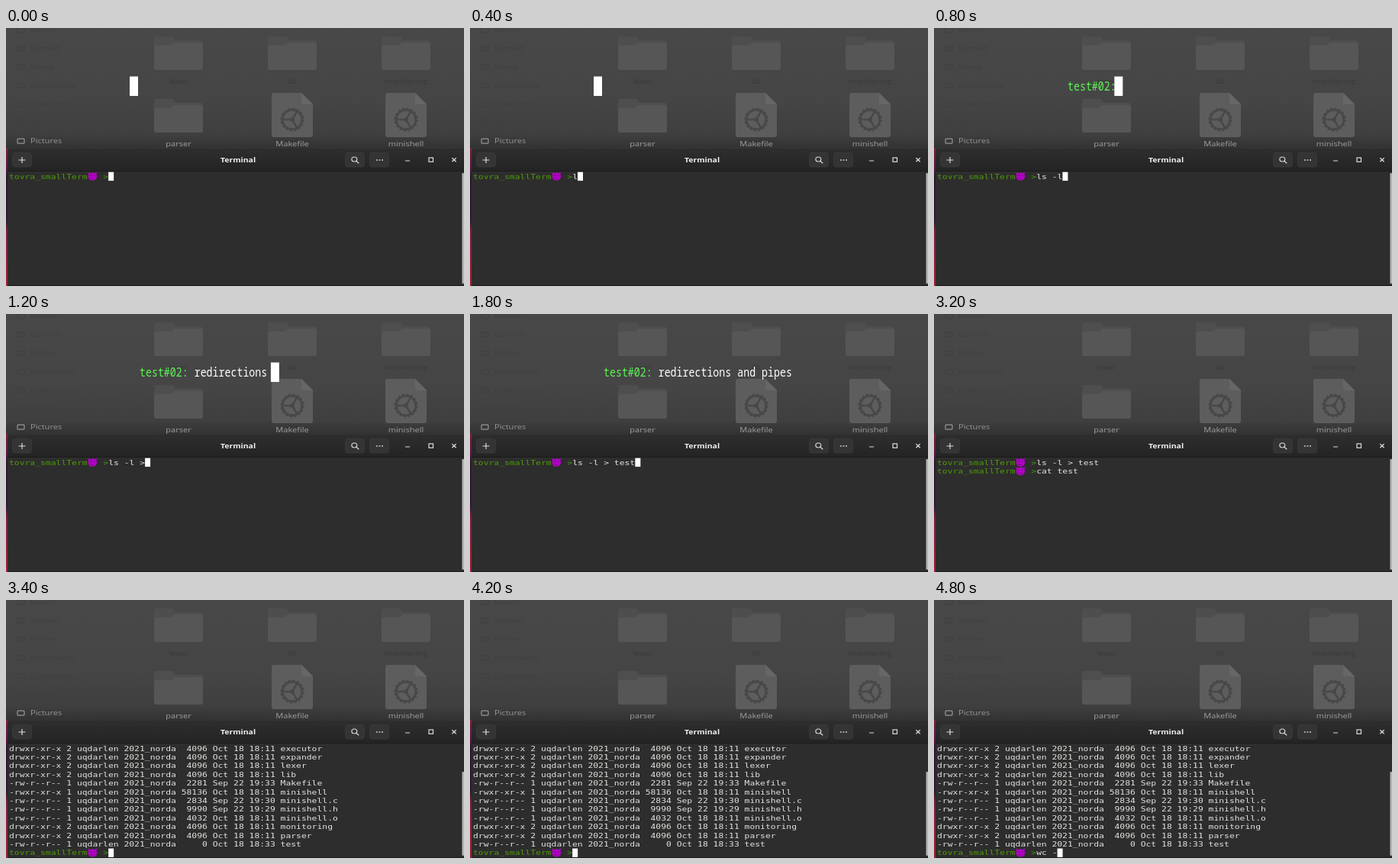
Animation of 600 by 338 pixels, one loop 5 s. Source, as an HTML page:

```html
<!DOCTYPE html>
<html lang="en">
<head>
<meta charset="utf-8">
<title>Shell demo</title>
<style>
html, body { margin: 0; height: 100%; overflow: hidden; background: #2d2d2d; }
svg { display: block; width: 100vw; height: 100vh; }
text { white-space: pre; }
.ui { font: 9.5px "Open Sans", sans-serif; }
.term { font: 9.2px "DejaVu Sans Mono", monospace; }
.title { font: 15.5px "Noto Sans Mono", monospace; }
</style>
</head>
<body>
<svg viewBox="0 0 600 338">
  <defs>
    <linearGradient id="desk" x2="0" y2="1">
      <stop offset="0" stop-color="#484848"/>
      <stop offset=".6" stop-color="#454545"/>
      <stop offset=".88" stop-color="#3f3f3f"/>
      <stop offset="1" stop-color="#323232"/>
    </linearGradient>
    <linearGradient id="head" x2="0" y2="1">
      <stop offset="0" stop-color="#2e2e2e"/>
      <stop offset="1" stop-color="#242424"/>
    </linearGradient>
    <linearGradient id="wall" x2="0" y2="1">
      <stop offset="0" stop-color="#7c2146"/>
      <stop offset=".15" stop-color="#5a1c40"/>
      <stop offset=".2" stop-color="#2c1a2e"/>
      <stop offset=".53" stop-color="#331a30"/>
      <stop offset=".6" stop-color="#7d2040"/>
      <stop offset="1" stop-color="#a0243c"/>
    </linearGradient>
    <clipPath id="reveal"><rect id="shown" y="60" width="0" height="32"/></clipPath>
    <g id="folder">
      <path d="M-32 -19q0-3 3-3h20q2 0 3 2l2 3h33q3 0 3 3v33h-64z" fill="#4e4e4e"/>
      <path d="M-32 -8q0-2 3-2h18q2 0 4-2l2-2h34q3 0 3 3v30q0 3-3 3h-58q-3 0-3-3z" fill="#565656"/>
    </g>
    <g id="file">
      <path d="M-27 -26q0-3 3-3h36l15 15v40q0 3-3 3h-48q-3 0-3-3z" fill="#5d5d5d"/>
      <path d="M12 -29l15 15h-12q-3 0-3-3z" fill="#666"/>
      <g transform="translate(0 6)" fill="none" stroke="#484848">
        <circle r="14.8" stroke-width="1.6" stroke-dasharray="3 2.81"/>
        <circle r="12.8" stroke-width="3"/>
        <path d="M0 0H-12M0 0L6 -10.4M0 0L6 10.4" stroke-width="2.6"/>
        <circle r="2.5" fill="#484848"/>
      </g>
    </g>
    <g id="imp" fill="#b400c8">
      <path d="M-6 -5.5q0 3 2 4l2-2zM6 -5.5q0 3-2 4l-2-2z"/>
      <ellipse rx="5.8" ry="5.2" cy=".3"/>
      <path d="M-3.4 -1.6l2.4 1M3.4 -1.6l-2.4 1M-2.8 2.2q2.8 2.2 5.6 0" fill="none" stroke="#740086"/>
    </g>
  </defs>

  <rect width="600" height="158" fill="url(#desk)"/>
  <g id="files"></g>

  <rect y="157" width="4" height="181" fill="url(#wall)"/>
  <path d="M2 338V161q0-4 4-4H600V338z" fill="#2d2d2d"/>
  <path d="M2 187V161q0-4 4-4H600V187z" fill="url(#head)"/>
  <path d="M5 157.5H600" stroke="#343434"/>
  <path d="M2 187.5H600M2 337.5H600" stroke="#1b1b1b"/>
  <g fill="#343434" stroke="#3d3d3d" stroke-width=".7">
    <rect x="8.5" y="163.5" width="25" height="18.5" rx="3.5"/>
    <rect x="444.5" y="163.5" width="25" height="18.5" rx="3.5"/>
    <rect x="476.5" y="163.5" width="25" height="18.5" rx="3.5"/>
  </g>
  <g fill="none" stroke="#dcdcdc" stroke-width="1.2">
    <path d="M16.5 173h9M21 169v8M458.7 174.3l3.6 3M523 174h6M584.3 170.2l5.4 5M589.7 170.2l-5.4 5"/>
    <ellipse cx="456.3" cy="172" rx="3.4" ry="3"/>
    <rect x="554" y="170" width="5.5" height="5.3"/>
    <path d="M485 173h9" stroke-width="1.6" stroke-dasharray="1.7 1.9"/>
  </g>
  <text class="ui" transform="translate(304 176) scale(1.165 1)" text-anchor="middle" style="font-size:9px;font-weight:700" fill="#f0f0f0">Terminal</text>
  <rect id="bar" x="597.5" width="2.5" rx="1" fill="#b4b4b0"/>

  <g id="screen"></g>
  <g id="title">
    <g clip-path="url(#reveal)">
      <text class="title" transform="translate(175 81.8) scale(.857 1)" fill="#fff"><tspan fill="#5df552">test#02:</tspan> redirections and pipes</text>
    </g>
    <rect id="caret" y="63.5" width="11" height="25.5" fill="#fff"/>
  </g>
</svg>
<script>
const $ = id => document.getElementById(id);
const CELL = 6.85, ROW = 11.4, LEFT = 4, TOP = 188.7;
const UI_WIDE = 1.165, TERM_WIDE = CELL / (9.2 * .602);
const PROMPT = 'tovra_smallTerm', TYPED_COL = 19;

const label = (s, x, y, fill, anchor = 'middle') =>
  `<text class="ui" transform="translate(${x} ${y}) scale(${UI_WIDE} 1)" text-anchor="${anchor}" fill="${fill}">${s}</text>`;

const icon = (kind, name, x, y, fill) =>
  `<use href="#${kind}" x="${x}" y="${y}"/>` + label(name, x, y < 60 ? 73 : 155.2, fill);

const places = ['Recent', 'Starred', 'Home', 'Documents', 'Downloads', 'Music', 'Pictures'];
$('files').innerHTML =
  places.map((name, i) => {
    const fill = i < 6 ? '#404040' : '#969696', y = 3 + i * 24.2;
    return label(name, 32, y + 3, fill, 'start') +
      `<rect x="15" y="${y - 3}" width="9" height="6" rx="1" fill="none" stroke="${fill}" stroke-width="1.2"/>`;
  }).join('') +
  ['lexer', 'lib', 'monitoring'].map((name, i) => icon('folder', name, 226 + i * 149, 33, '#393939')).join('') +
  icon('folder', 'parser', 226, 115, '#a0a0a0') +
  icon('file', 'Makefile', 375, 114, '#a0a0a0') +
  icon('file', 'minishell', 524, 114, '#a0a0a0');

const DIR = 'drwxr-xr-x 2', DOC = '-rw-r--r-- 1', EXE = '-rwxr-xr-x 1', BUILT = 'Oct 18 18:11';
const listing = [
  [DIR, 4096, BUILT, 'executor'],
  [DIR, 4096, BUILT, 'expander'],
  [DIR, 4096, BUILT, 'lexer'],
  [DIR, 4096, BUILT, 'lib'],
  [DOC, 2281, 'Sep 22 19:33', 'Makefile'],
  [EXE, 58136, BUILT, 'minishell'],
  [DOC, 2834, 'Sep 22 19:30', 'minishell.c'],
  [DOC, 9990, 'Sep 22 19:29', 'minishell.h'],
  [DOC, 4032, BUILT, 'minishell.o'],
  [DIR, 4096, BUILT, 'monitoring'],
  [DIR, 4096, BUILT, 'parser'],
  [DOC, 0, 'Oct 18 18:33', 'test']
].map(([mode, size, date, name]) =>
  `${mode} uqdarlen 2021_norda ${String(size).padStart(5)} ${date} ${name}`);

const colX = col => LEFT + col * CELL;
const rowY = row => TOP + row * ROW;

const write = (s, col, row, fill = '#e4e4e0') =>
  `<text class="term" fill="${fill}" transform="translate(${colX(col)} ${rowY(row) + 8.9}) scale(${TERM_WIDE} 1)">${s.replace(/>/g, '&gt;')}</text>`;

function command(typed, row, cursor) {
  let out = write(PROMPT, 0, row, '#4e9a06') + write('>', 18, row, '#4e9a06') +
    `<use href="#imp" x="${colX(16) - .3}" y="${rowY(row) + 5.6}"/>` + write(typed, TYPED_COL, row);
  if (cursor) out += `<rect x="${colX(TYPED_COL + typed.length)}" y="${rowY(row)}" width="7" height="11.4" fill="#fff"/>`;
  return out;
}

// Characters typed at each 200 ms step
const FIRST = 'ls -l > test', SECOND = 'cat test', THIRD = 'wc -';
const firstLen = [0, 0, 1, 3, 5, 6, 7, 8, 10, 12];
const secondLen = [0, 0, 0, 1, 5, 8, 8];

function terminal(k) {
  if (k < 10) return command(FIRST.slice(0, firstLen[k]), 0, true);
  if (k < 17) return command(FIRST, 0, false) +
    command(SECOND.slice(0, secondLen[k - 10]), 1, ![10, 12, 16].includes(k));
  const n = k < 22 ? 0 : k - 20;
  return listing.map((line, i) => write(line, 0, i)).join('') +
    command(THIRD.slice(0, n), 12, n > 0 || k % 2 === 1);
}

function draw(k) {
  const moving = k >= 3 && k <= 7;
  const x = k < 3 ? 162 : Math.min(424, 181 + (k - 3) * 55.3);
  $('title').style.display = k < 14 ? '' : 'none';
  $('caret').setAttribute('x', x);
  $('caret').style.display = moving || k % 2 === 0 ? '' : 'none';
  $('shown').setAttribute('width', x + 2);

  const barTop = k < 17 ? 190 : 225;
  $('bar').setAttribute('y', barTop);
  $('bar').setAttribute('height', 335 - barTop);
  $('screen').innerHTML = terminal(k);
}

let last = -1;
function tick() {
  const k = Math.floor(performance.now() % 5000 / 200);
  if (k !== last) draw(last = k);
  requestAnimationFrame(tick);
}
tick();
</script>
</body>
</html>
```
